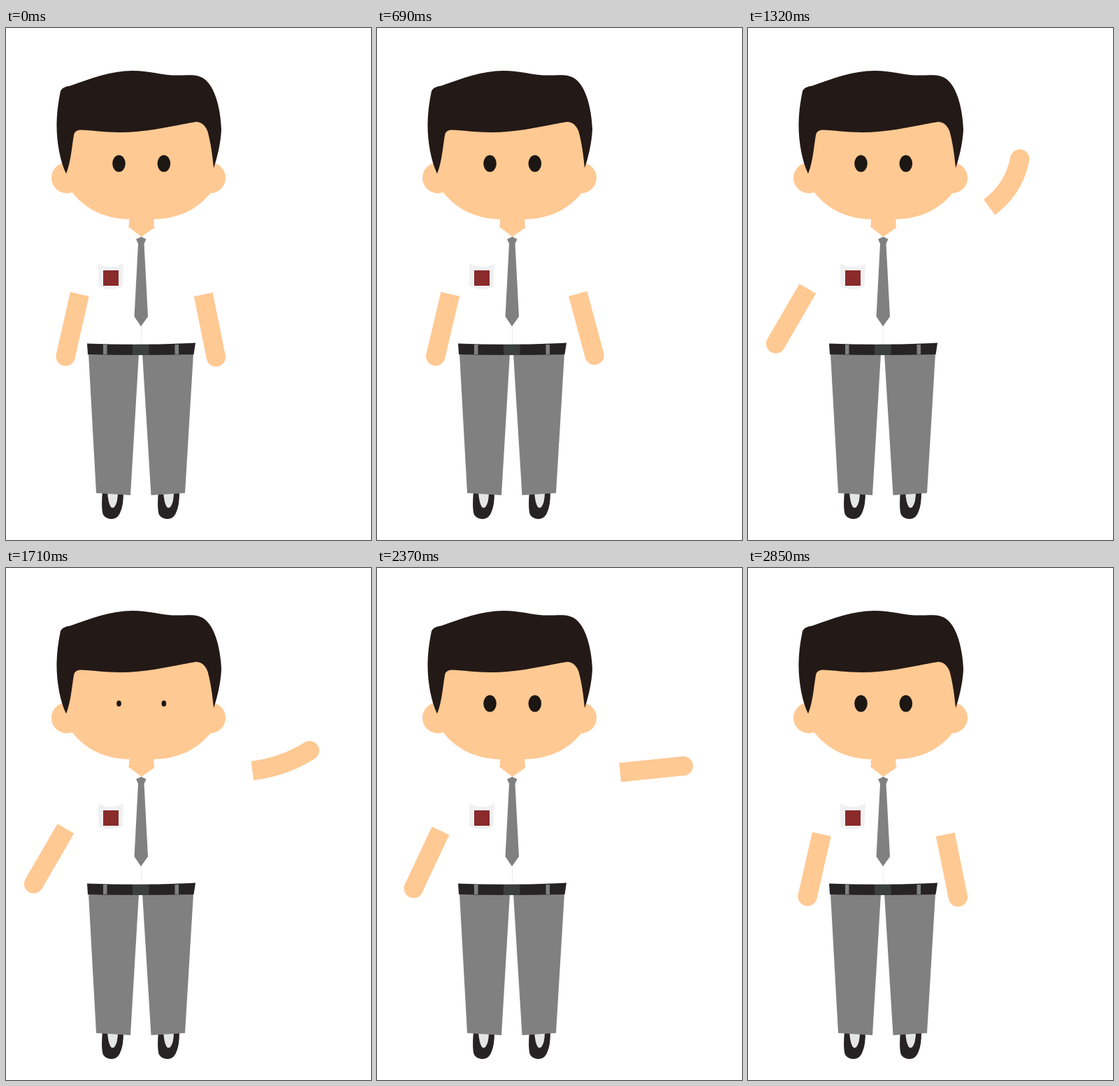
Animation, 522 px wide and 731 px high, one loop 3.3 s. Source, as an HTML page:

```html
<!DOCTYPE html>
<html lang="en">
<head>
<meta charset="utf-8">
<title>Waving student</title>
<style>
  html, body { margin: 0; width: 100%; height: 100%; overflow: hidden; background: #fff; }
  svg { display: block; width: 100%; height: 100%; }
  .skin { fill: #ffc993; }
  .hair { fill: #231916; }
  .grey { fill: #808080; }
  .black { fill: #272324; }
  .limb { fill: none; stroke: #ffc993; stroke-width: 27.4; }
</style>
</head>
<body>
<svg viewBox="0 0 522 731">
  <defs>
    <g id="shoe">
      <path class="black" d="M138 662C136.500 678 137 690 139 695Q143 701 152 701Q161 700 164 690Q168 681 168 662Z"/>
      <path fill="#e6e6e6" d="M145 662H160Q160 678 155 684Q152.500 686 150 684Q146 678 145 662Z"/>
    </g>
  </defs>

  <use href="#shoe"/>
  <use href="#shoe" x="80"/>
  <path class="grey" d="M118 465H190L178 667L129 664ZM195 465H268L256 664L207.500 667Z"/>
  <path class="black" d="M116 450.500Q193 453.500 271 449.500L268.500 466Q193 468 117 466Z"/>
  <path fill="#3b3f3e" d="M181 452H204.500V467H181Z"/>
  <path class="grey" d="M139 452H144.500V466H139ZM241.500 452H247V466H241.500Z"/>

  <path class="skin" d="M176 268H211.500V283L213 284.500L193.500 298L174 283L176 282Z"/>
  <path fill="#ececec" d="M193 425H194V450H193Z"/>
  <path class="grey" d="M186 301.500L193.500 298L200.500 301.500L197.500 308L203 412L193 426L183.500 412L189 308Z"/>
  <path fill="#f1f1f1" d="M132 336Q150 346 168 336L166.500 369Q150 377 132 369Z"/>
  <rect x="139" y="346" width="22" height="22" fill="#8a2a2b"/>

  <circle class="skin" cx="87" cy="214" r="22"/>
  <circle class="skin" cx="292" cy="214" r="22"/>
  <path class="skin" d="M85 120V205L95 235C115 261 146 273 176 273H212C242 273 273 261 293 235L298 195V120Z"/>
  <path class="hair" d="M86 208C77 190 72 160 72.500 136C73 115 76 100 78 90Q80 84 92 82.500C122 72 150 61 181 61C205 61 222 67 238 67.500C255 68 266 66 276 69C298 75 307 115 308 145C307 165 302 185 297 200C295 180 293 165 288.500 148Q283 134 272 134C235 140 205 149 163 149C140 149 124 146 106 145.500Q98 146 97 153C94 170 93 190 86 208Z"/>
  <g id="eyes" fill="#1c1712"></g>

  <path id="armL" class="limb"/><circle id="handL" class="skin" r="13.7"/>
  <path id="armR" class="limb"/><circle id="handR" class="skin" r="13.7"/>
</svg>
<script>
  const LOOP = 3300, TICK = 30;
  const el = id => document.getElementById(id);
  const svgNS = 'http://www.w3.org/2000/svg';

  // Tables of [ms, value]; angles in degrees, clockwise from the right.
  const LEFT = [[625, 102.8], [1235, 120.2], [2097, 120.2], [2850, 102.8]];
  const RIGHT = [[625, 78.5], [1212, -42.5], [1645, -5], [2085, -42.5], [2850, 78.5]];
  const BEND = [[930, 0], [1212, 46], [1645, 24], [2090, 46], [2390, 0]];
  const BLINK = [[180, 1], [360, .36], [540, 1], [1530, 1], [1710, .36], [1890, 1]];

  const eyes = [161.5, 225.8].map(x => {
    const eye = document.createElementNS(svgNS, 'ellipse');
    eye.setAttribute('cx', x);
    eye.setAttribute('cy', 193.5);
    return el('eyes').appendChild(eye);
  });

  function sample(track, t) {
    if (t <= track[0][0]) return track[0][1];
    for (let i = 1; i < track.length; i++) {
      const [t0, a] = track[i - 1], [t1, b] = track[i];
      if (t < t1) return a + (b - a) * (1 - Math.cos(Math.PI * (t - t0) / (t1 - t0))) / 2;
    }
    return track[track.length - 1][1];
  }

  function walk([x, y], angle, dist) {
    const r = angle * Math.PI / 180;
    return [x + dist * Math.cos(r), y + dist * Math.sin(r)];
  }

  // The sleeve is white, so only the part from cuff to hand is drawn.
  function drawArm(side, shoulder, angle, bend, sleeve) {
    const sag = Math.min(8, Math.max(0, (bend - 25) * .46));
    const cuff = walk(shoulder, angle + sag, sleeve + bend * .2);
    const elbow = walk(cuff, angle, 45);
    const hand = walk(elbow, angle - bend, 46 - bend * .08);
    el('arm' + side).setAttribute('d', `M${cuff}Q${elbow} ${hand}`);
    el('hand' + side).setAttribute('cx', hand[0]);
    el('hand' + side).setAttribute('cy', hand[1]);
  }

  function draw(t) {
    drawArm('L', [121, 311], sample(LEFT, t), 0, 70.8);
    drawArm('R', [265.8, 300], sample(RIGHT, t), sample(BEND, t), 82.2);
    const open = sample(BLINK, t);
    for (const eye of eyes) {
      eye.setAttribute('rx', 9.3 * open);
      eye.setAttribute('ry', 12.1 * open);
    }
  }

  const start = performance.now();
  function frame() {
    const t = (performance.now() - start) % LOOP;
    draw(Math.floor(t / TICK) * TICK);
    requestAnimationFrame(frame);
  }
  frame();
</script>
</body>
</html>
```
